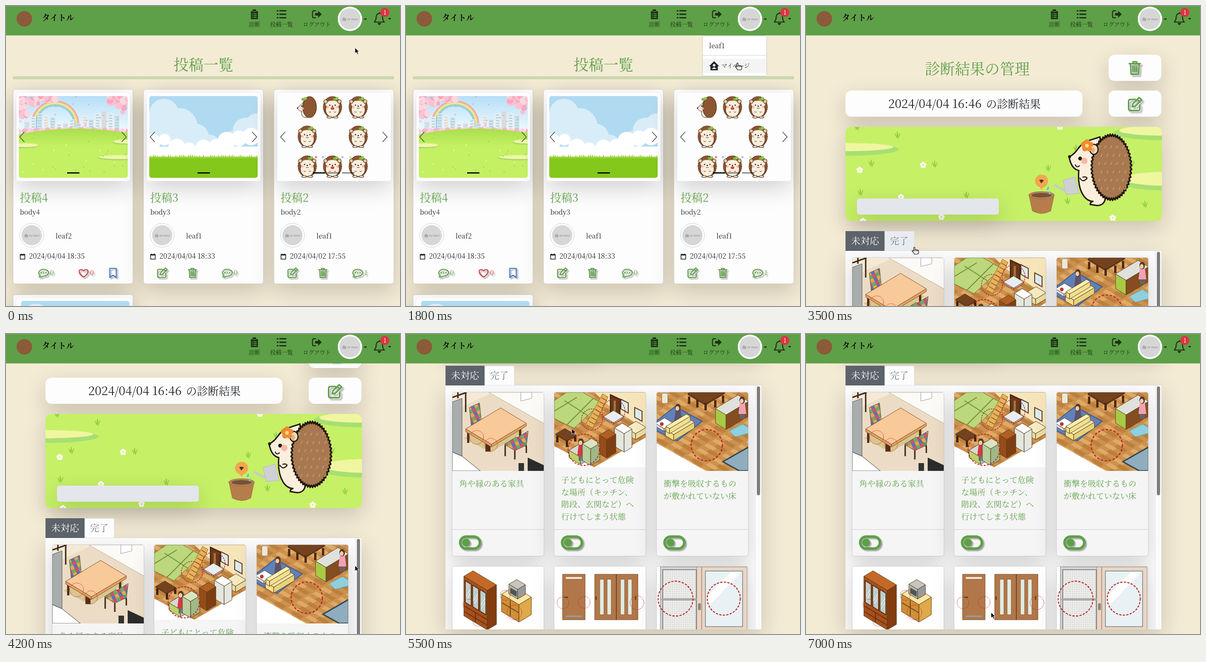
These frames come from a looping animation (858x653 px, 7100 ms). An HTML page:

```html
<!DOCTYPE html>
<html lang="ja">
<head>
<meta charset="utf-8">
<style>
html, body { margin: 0; width: 100%; height: 100%; overflow: hidden; background: #f4ebd5; }
#stage { position: relative; width: 858px; height: 653px; overflow: hidden; }
#stage div, #stage svg { position: absolute; box-sizing: border-box; }
#stage .layer { left: 0; top: 0; width: 858px; height: 653px; overflow: visible; }
.lift { box-shadow: 0 16px 48px rgba(0,0,0,.175); }
.drop { filter: drop-shadow(3px 3px 1px rgba(0,0,0,.32)); }
.line { fill: none; stroke: currentColor; stroke-width: 2.2; stroke-linejoin: round; stroke-linecap: round; }
text { font-family: "Noto Serif CJK JP", "Noto Serif JP", "Noto Serif", "Noto Sans CJK JP", serif; white-space: pre; }
.bold { font-weight: 500; }
</style>
</head>
<body>
<div id="stage"></div>
<script>
const GREEN = '#5ea047', SLATE = '#5c636a', INK = '#212529', DARK = '#22150d', NAV = '#1c2e15';
const USERS = ['leaf1', 'leaf2'], MAIL = 'leafbox@domain.test';

// Drawing helpers
const box = (x, y, w, h, css = '', inner = '', cls = '') =>
  `<div class="${cls}" style="left:${x}px;top:${y}px;width:${w}px;height:${h}px;${css}">${inner}</div>`;
const layer = s => `<svg class="layer">${s}</svg>`;
const pic = (x, y, w, h, r, s) => box(x, y, w, h, `border-radius:${r};overflow:hidden`,
  `<svg width="${w}" height="${h}" viewBox="${x} ${y} ${w} ${h}">${s}</svg>`);
const text = (x, y, size, s, fill = INK, attr = '') =>
  `<text x="${x}" y="${y}" font-size="${size}" fill="${fill}" ${attr}>${s}</text>`;
const head = (x, y, size, s, fill = GREEN) => text(x, y, size, s, fill, 'class="bold"');
const path = (d, fill, line = 'none', w = 1, attr = '') =>
  `<path d="${d}" fill="${fill}" stroke="${line}" stroke-width="${w}" ${attr}/>`;
const poly = (pts, fill, line, w) => path(`M${pts}Z`, fill, line, w);
const pen = (d, c, w) => path(d, 'none', c, w);
const oval = (x, y, a, b, fill, attr = '') => `<ellipse cx="${x}" cy="${y}" rx="${a}" ry="${b}" fill="${fill}" ${attr}/>`;
const dot = (x, y, r, fill, attr) => oval(x, y, r, r, fill, attr);
const rect = (x, y, w, h, fill, attr = '') =>
  `<rect x="${x}" y="${y}" width="${w}" height="${h}" fill="${fill}" ${attr}/>`;
const at = (x, y, k, s, attr = '') => `<g transform="translate(${x} ${y}) scale(${k})" ${attr}>${s}</g>`;
const each = (list, f) => list.map(f).join('');
const many = (n, f) => each([...Array(n).keys()], f);
const rnd = n => { const v = Math.sin(n * 127.1 + 3.7) * 43758.5453; return v - Math.floor(v); };

// Icons, centred on 0,0
const line = d => `<path class="line" d="${d}"/>`;
const solid = d => path(d, 'currentColor');
const icons = {
  clip: bg => solid('M-8 -7H-4V-11H4V-7H8V11H-8Z') + pen('M-4 -6H4', bg, 1.2) + each([-1, 3, 7], y => pen(`M-6 ${y}H-4M-2 ${y}H5`, bg, 1.8)),
  list: () => each([-8, 0, 8], y => pen(`M-11 ${y}H-7M-5 ${y}H11`, 'currentColor', 3)),
  out: () => line('M-3 -8H-7Q-10 -8 -10 -5V5Q-10 8 -7 8H-3') + solid('M-4 -3H3V-8L11 0L3 8V3H-4Z'),
  bell: () => line('M-11 8Q-7 4 -7 -2Q-7 -10 0 -11Q7 -10 7 -2Q7 4 11 8ZM0 -11V-13') + solid('M-4 10H4Q3 14 0 14Q-3 14 -4 10'),
  cal: () => pen('M-5 -4H5V6H-5ZM-3 -6V-4M3 -6V-4', 'currentColor', 1.5) + solid('M-5 -5H5V-2H-5Z'),
  chat: () => line('M-8 5C-14 0 -9 -8 0 -8C14 -8 14 7 0 7Q-4 9 -10 9Q-8 7 -8 5Z') + each([-5, 0, 5], x => dot(x, -.5, 1.6, 'currentColor')),
  heart: () => line('M0 9C-16 -1 -9 -12 0 -5C9 -12 16 -1 0 9Z'),
  mark: () => line('M-7 -10H7V10L0 5L-7 10Z'),
  edit: () => line('M1 -8H-7Q-10 -8 -10 -5V7Q-10 10 -7 10H5Q8 10 8 7V1M-4 4L-3 -1L7 -11L11 -7L1 3ZM4 -8L8 -4'),
  trash: () => line('M-9 -7H9M-3 -7V-10H3V-7M-7 -7L-6 10H6L7 -7M-3 -3V6M0 -3V6M3 -3V6'),
  user: () => dot(-6, -8, 8, 'currentColor') + solid('M-19 13Q-18 2 -6 2Q0 2 4 6L0 13ZM3 14L5 8L14 -1L19 4L10 13Z'),
  home: () => solid('M-11 1L0 -10L11 1H8V10H-8V1Z') + dot(0, -1, 2.8, '#fff') + path('M-5 7Q0 0 5 7Z', '#fff')
};
const icon = (name, x, y, k = 1, color = GREEN, bg = GREEN) =>
  at(x, y, k, icons[name](bg), `style="color:${color}" class="drop"`);
const flat = (...a) => icon(...a).replace('class="drop"', '');

const avatar = (x, y, r, gap, edge = 'none') => dot(x, y, r, '#fff', `stroke="${edge}"`) + dot(x, y, r - gap, '#d6d6d6') +
  at(x, y, (r - gap) / 81, path('M-57 -4H-50V-8H-38V-4H-31V16H-57Z', '#999') + dot(-44, 6, 7, 'none', 'stroke="#d6d6d6" stroke-width="2"') +
    pen('M-57 17L-33 -8', '#d6d6d6', 2.5) +
    `<text x="-21" y="10" font-size="17" font-weight="600" fill="#999" style="font-family:'Open Sans',sans-serif">NO IMAGE</text>`);

// Carousel pictures
const spring = () => {
  const blossom = (x, y, w, h, n) => many(n, i => dot(x + rnd(x + i) * w, y + rnd(x + i + 50) * h,
    4 + rnd(i + y) * 4, ['#f9c3d2', '#f7a9c0', '#fbd7e0'][i % 3]));
  return pic(28, 196, 237, 178, '5px', at(28, 196, 1, rect(0, 0, 237, 178, 'url(#sky)') +
    each(['#f3a2a2', '#f7c88a', '#f5ec95', '#a9dba0', '#93c8ec'], (c, i) => dot(79, 62, 51 - i * 2.5, 'none', `stroke="${c}" stroke-width="2.6"`)) +
    many(15, i => { const h = 18 + rnd(i) * 28, x = 12 + i * 14;
      return rect(x, 78 - h, 11, h, i % 2 ? '#e8eef0' : '#d2e3ec') +
        many(h / 6 | 0, j => rect(x + 2, 81 - h + j * 6, 7, 2, i % 3 ? '#a9cbdc' : '#e9cdb7')); }) +
    many(20, i => dot(i * 12.5, 77 - 4 * Math.sin(i / 6), 6, i % 2 ? '#f7b5c6' : '#fad0da')) +
    path('M0 83Q115 60 237 80V178H0Z', 'url(#hill)') +
    each([[12, 109, 28], [216, 135, 44], [230, 101, 26]], ([x, y, a]) => oval(x, y, a, 5, '#a3dc70') + oval(x + 2, y - 2, a, 4, '#f2f6a5')) +
    many(28, i => dot(rnd(i + 9) * 237, 90 + rnd(i + 40) * 84, 1.1, i % 3 ? '#8ecb3f' : '#fff')) +
    blossom(0, 0, 80, 9, 24) + blossom(2, 6, 40, 14, 16) + blossom(1, 14, 18, 32, 12) + blossom(192, 0, 45, 18, 22) + blossom(216, 10, 22, 28, 10) +
    many(18, i => dot(rnd(i + 3) * 237, rnd(i + 70) * 70, 1.6, '#f6a5bd'))));
};
const meadow = (x, y) => {
  const puffs = (list, c) => each(list, ([a, b, r]) => dot(a, b, r, c));
  return pic(x, y, 236, 178, '5px', at(x, y, 1, rect(0, 0, 236, 178, '#b0daf1') +
    puffs([[32, 38, 32], [65, 66, 40], [100, 90, 30], [132, 106, 22], [210, 75, 28], [182, 98, 22], [232, 58, 20], [5, 70, 34]], '#d9edf8') +
    puffs([[8, 100, 17], [33, 95, 13], [60, 112, 19], [87, 116, 15], [118, 112, 17], [145, 110, 16], [168, 97, 19], [196, 92, 17], [222, 88, 19]], '#fff') +
    rect(0, 110, 236, 30, '#fff') + rect(0, 133, 236, 45, '#84c81b') +
    poly('0 136 ' + many(119, i => `${i * 2} ${i % 2 ? 126 + rnd(i) * 5 : 134} `) + '238 136', '#92d02f')));
};
const hogs = () => {
  const edge = 'stroke="#4b2c18" stroke-width="1.2"', cream = '#fbefdc';
  const pair = (x, f) => f(-x) + f(x);
  const side = path('M-1 -18Q-10 -8 -22 2Q-16 10 -12 9Q-16 24 2 23L9 12Z', cream, '#4b2c18') + oval(5, 0, 15, 23, '#8b5631', edge) +
    dot(-12, -2, 1.4, '#222') + dot(-10, 3, 2.5, '#f6b5ad') + dot(-21, 2, 1.5, '#222');
  const front = i => oval(0, 0, 20, 23, '#8b5631', edge + ' stroke-dasharray="3 1"') + oval(0, 6, 15, 16, cream, edge) + oval(0, -6, 15, 8, cream) +
    pair(15, x => dot(x, -12, 4, '#e9c7a3', edge)) + pair(6, x => dot(x, -4, 1.4, '#222')) + pair(11, x => dot(x, 0, 2.6, '#f6b5ad')) +
    dot(0, -2, 1.5, '#222') + (i % 5 === 1 ? oval(0, 3, 4, 3, '#d9463f') : pen('M-3 2Q0 4 3 2', '#333')) +
    pen('M-8 10q3 3 5 0M3 10q2 3 5 0', '#4b2c18') + pair(7, x => oval(x, 22, 5, 2, cream, edge));
  return each([0, 1, 2, 3, 5, 6, 7, 8], (n, i) => at([656, 711, 767][n % 3], [220, 284, 349][n / 3 | 0], 1,
    (i ? front(i) : side) + oval(i ? 6 : -8, -17, 5, 3, '#7cb83e') + oval(i ? 10 : -4, -19, 3, 3, '#93cd50'))) +
    each(['#ee7e8a', '#9fd3ee', '#9fd3ee', '#d7e68a'], (c, i) => dot([675, 690, 733, 750][i], 329, 2.5, c));
};

const banner = () => {
  const tuft = ([x, y]) => pen(`M${x - 5} ${y - 9}L${x - 1} ${y}L${x} ${y - 13}L${x + 2} ${y}L${x + 6} ${y - 10}`, '#97cf4b', 2);
  const flower = (x, y, k = 1, c = '#fff') => at(x, y, k, many(5, i => dot(4 * Math.sin(i * 1.257), -4 * Math.cos(i * 1.257), 3, c)) + dot(0, 0, 2, '#f8e07a'));
  const spines = many(104, i => {
    const a = i * Math.PI / 52, k = i % 2 ? 1.03 : .96;
    return `${(665 + 43 * k * Math.cos(a)).toFixed(1)} ${(351 + 70 * k * Math.sin(a)).toFixed(1)} `;
  });
  return pic(86, 263, 689, 205, '12px', rect(86, 263, 689, 205, '#c6f066') +
    each([[86, 312, 116, 14], [775, 276, 105, 16], [775, 381, 95, 20]], ([x, y, a, b]) => oval(x, y, a, b, '#a7df72') + oval(x, y - 5, a - 12, b - 5, '#f0f6a0')) +
    each([[199, 287], [142, 348], [280, 350], [118, 411], [349, 417], [527, 358], [569, 430], [738, 437], [588, 315], [709, 348], [111, 269]], tuft) +
    each([[117, 357], [255, 346], [207, 416], [295, 459], [668, 461], [553, 263], [124, 468]], p => flower(...p)) +
    path('M486 413L493 446Q513 457 533 446L540 413Z', '#b67d4b', '#9c673b') + oval(513, 412, 28, 8, '#b98453', 'stroke="#9c673b"') + oval(513, 412, 22, 5, '#76503a') +
    path('M508 393L513 400L518 393Z', '#f3a64f') + dot(513, 381, 14, '#f3a64f') + path('M508 379Q514 376 518 380L512 386Z', '#54331e') +
    path('M528 392q-7 7 -2 9q5 -1 2 -9M532 402q-6 6 -2 8q5 0 2 -8', '#66bfe8') +
    pen('M540 389L564 402', '#c9cace', 5) + path('M560 379L586 372L595 408L566 410Z', '#cfd0d4', '#b8b9be') +
    path('M573 328C588 322 594 305 606 296L640 285L650 415C654 424 646 436 632 434L619 432Q619 426 626 425C612 427 590 408 594 358C584 356 576 346 573 328Z', '#fbefdc', DARK, 3) +
    path(`M${spines}Z`, '#a87850', DARK, 3.2, 'stroke-linejoin="round"') +
    many(30, i => pen(`M${640 + i % 5 * 13 + (i / 5 & 1) * 5} ${304 + (i / 5 | 0) * 18}l-3 6`, '#c99a6e', 2)) +
    oval(627, 312, 9, 11, '#f0dcb9', `stroke="${DARK}" stroke-width="2.5"`) + oval(625, 314, 4, 6, '#dfb181') +
    dot(597, 332, 4.2, DARK) + dot(606, 337, 7, '#f8b7a8') + dot(574, 328, 3.3, DARK) + pen('M586 345Q590 354 596 347', DARK, 2) +
    path('M596 374Q603 386 612 375Q610 370 602 373', '#fbefdc', DARK, 2.4) + flower(612, 304, 2, '#f18a35'));
};

// Room pictures: block() is an isometric box standing on its front corner
const block = (x, y, a, b, h, top, left, right = left, c = '#5a3a20') => at(x, y, 1,
  poly(`0 0 ${-a} ${-a * .6}v${-h}L0 ${-h}`, left, c) + poly(`0 0 ${b} ${-b * .6}v${-h}L0 ${-h}`, right, c) +
  poly(`0 ${-h} ${-a} ${-a * .6 - h} ${b - a} ${-(a + b) * .6 - h} ${b} ${-b * .6 - h}`, top, c));
const ring = (x, y, r, w = 1) => dot(x, y, r, 'none', `stroke="#c0281f" stroke-width="${w}" stroke-dasharray="${w * 2.2} ${w * 1.3}"`);
const legs = (list, h, c = '#53301d') => each(list, ([x, y]) => rect(x, y, 5, h, c));
const person = (x, y, top) => legs([[x - 5, y + 24], [x + 1, y + 24]], 17, '#666') +
  path(`M${x - 8} ${y + 30}L${x - 5} ${y + 6}H${x + 6}L${x + 9} ${y + 30}Z`, top) + oval(x, y, 6, 8, '#5b3826') + oval(x - 1, y + 2, 4, 5, '#f3cda8');
const PATCH = 'url(#patch)', WOOD = 'url(#wood)';
const rooms = [
  () => rect(101, 127, 200, 171, '#ecdcc5') + poly('101 127 190 127 101 168', '#f5e9d6') + poly('180 127 301 127 301 195', '#fcfaf6', '#b8aa98') +
    poly('101 148 122 140 122 266 101 257', '#a9adad', '#555') + poly('101 257 122 266 162 298 101 298', '#fff', '#333') +
    pen('M101 138L132 127M113 127V140M130 127V170', '#3b2418', 3) + poly('250 127 274 127 274 140 250 146', '#fff', '#999') + poly('125 226 184 258 258 212 235 190', '#d8c68e') +
    poly('138 160 160 150 164 188 142 198', PATCH, '#553') + poly('142 198 164 186 180 195 158 206', PATCH, '#553') + legs([[133, 214], [246, 207]], 23) + rect(173, 238, 11, 18, '#53301d') +
    block(186, 246, 56, 76, 6, '#f8c999', '#e59f64', '#e59f64', '#81502b') + poly('266 211 262 244 235 246 241 226', PATCH, '#553') + poly('214 240 240 224 262 242 237 254', PATCH, '#553') +
    pen('M216 242V266M237 254V273M262 243V259', '#3b2418', 3) + rect(245, 281, 12, 17, '#333') + poly('265 269 301 286 301 298 265 298', '#2c2c2c') + ring(154, 225, 15) + ring(185, 241, 14),
  () => poly('323 127 524 127 524 224 410 290 323 244', WOOD) + poly('410 127 524 127 524 210 440 155', '#f7e5ba', '#c8a570') +
    poly('323 145 350 127 385 127 425 150 366 205 323 184', '#bcd77c', '#617e36') + pen('M345 145L395 177M323 168L372 138M350 198L408 140', '#6f913b', 2) +
    poly('391 198 428 130 440 137 405 208', '#e7b35d', '#98662b') + many(8, i => pen(`M${394 + i * 4.5} ${198 - i * 8.5}l12 7`, '#9a6428', 2)) +
    poly('445 132 466 142 466 185 445 176', '#67381b', '#3b2212', 2) + rect(452, 145, 5, 28, '#a4723c') +
    each([[468, 142], [498, 160]], ([x, y]) => path(`M${x} ${y}l16 8v22l-16 -9Z`, '#dcebf0', '#623a20', 2)) +
    block(452, 196, 22, 22, 3, '#e8edf0', '#ccc') + block(500, 230, 22, 23, 13, '#f4ecc0', '#eadca2') + block(475, 257, 21, 17, 40, '#fff', '#e4e7de') +
    block(437, 270, 16, 20, 40, '#b0601f', '#974c16', '#7d3f12') + block(350, 234, 24, 20, 2, '#74421f', '#603719') + legs([[327, 222], [348, 232], [366, 220]], 14, '#422411') +
    block(380, 284, 25, 28, 16, '#d8dad4', '#bad267', '#bbb') + person(381, 235, '#d63944') + block(402, 286, 18, 20, 36, '#d7e6c0', '#b8cf9b', '#9fb986') +
    ring(405, 186, 23, 1.5) + ring(452, 168, 25, 1.5) + ring(387, 252, 34, 2),
  () => rect(545, 127, 201, 171, WOOD) + poly('545 237 653 298 545 298', '#fff') + poly('545 190 586 158 645 190 590 233 545 210', '#5f82b8', '#3f5d91', 2) +
    block(562, 212, 19, 20, 6, '#fff', '#ddd') + dot(557, 196, 4, '#bc3b33') + rect(557, 129, 13, 22, '#efe8d8', 'rx="3" stroke="#8c7b64"') + person(592, 160, '#605366') +
    block(583, 232, 18, 45, 13, '#f7e7a0', '#f2df8e', '#ead27b') + block(574, 217, 8, 45, 11, '#fff0ad', '#f2df8e') +
    block(652, 155, 38, 42, 3, '#74421f', '#5f3418') + legs([[614, 136], [650, 150], [688, 134], [632, 144], [671, 144]], 16, '#50290f') +
    block(697, 208, 23, 49, 32, '#dfe2dc', '#a9c945', '#844d22') + poly('704 211 733 196 746 204 746 216 717 224', '#8fd0de', '#4e9fb2') + person(732, 144, '#f3a1b6') +
    poly('690 278 746 246 746 298 726 298', '#90adbd', '#344851', 3) + ring(655, 242, 34, 2.5),
  () => block(177, 644, 51, 20, 86, '#c46927', '#a5521b', '#823d11') +
    many(3, i => at(129 + i * 16, 537 + i * 9.6, 1, path('M0 0l13 8v47l-13 -8Z', '#bcd0cc', '#663312', 2) + pen('M2 34l9 -15M3 42l8 -14', '#fff'))) +
    pen('M127 592L177 622M127 604L177 634M151 605V628', '#64310d', 2) + block(246, 627, 38, 27, 38, '#fae7a2', '#d08e36', '#dfa948') + pen('M209 585L246 607M227 579V614', '#724719', 2) +
    block(243, 577, 19, 17, 21, '#c5c5be', '#b8b8b1', '#999') + path('M227 552l14 8v12l-14 -8Z', '#4d5555') + ring(136, 589, 12) + ring(216, 569, 11) + ring(236, 606, 16) + ring(157, 624, 12),
  () => rect(341, 523, 49, 99, '#b27748', 'stroke="#794d2c"') + rect(348, 529, 35, 4, '#f1eadc') + rect(348, 613, 35, 3, '#89a2b3') + rect(344, 572, 9, 2, '#333') +
    rect(411, 523, 94, 99, '#b27748', 'stroke="#794d2c"') + pen('M458 523V622', '#724626', 2) + pen('M414 571V579M500 571V579', '#543017', 2) +
    each([422, 438, 467, 483], x => rect(x, 534, 9, 77, '#e1ebe2', 'stroke="#8e633f"')) + ring(342, 585, 13) + ring(388, 584, 13) + ring(503, 585, 15),
  () => rect(554, 507, 80, 170, '#d5d5d5', 'stroke="#777"') + rect(559, 513, 73, 164, 'url(#mesh)', 'stroke="#888" stroke-width="2"') + rect(556, 575, 78, 5, '#aaa') +
    each([[633, 11], [644, 99]], ([x, w]) => rect(x, 507, w, 170, '#ead5c3', 'stroke="#8e7a6e"')) + rect(652, 516, 81, 121, '#e8f2f5', 'stroke="#929a9c" stroke-width="2"') +
    poly('653 575 708 517 731 517 653 599', '#fff') + rect(636, 586, 6, 15, '#888', 'rx="2"') + ring(587, 576, 38, 2.2) + ring(692, 576, 36, 2.2)
];

const pattern = (id, w, h, turn, s) => `<pattern id="${id}" width="${w}" height="${h}" patternUnits="userSpaceOnUse" patternTransform="${turn}">${s}</pattern>`;
const fade = (id, a, b, end) => `<linearGradient id="${id}" x2="0" y2="1"><stop stop-color="${a}"/><stop offset="${end}" stop-color="${b}"/></linearGradient>`;
const defs = '<svg width="0" height="0">' + fade('sky', '#b5dff7', '#f3fbff', .45) + fade('hill', '#a9df4d', '#c4f064', .35) +
  pattern('wood', 44, 20, 'matrix(.87 .5 -.87 .5 0 0)', rect(0, 0, 44, 20, '#cc914e') + rect(0, 0, 22, 10, '#dfaa65') + rect(16, 10, 24, 10, '#bd7f3d')) +
  pattern('patch', 16, 16, 'rotate(-24)', each(['#d94d65', '#65ad68', '#5674bb', '#eda34f'], (c, i) => rect(i % 2 * 8, (i >> 1) * 8, 8, 8, c))) +
  pattern('mesh', 4, 4, '', rect(0, 0, 4, 4, '#f5f5f4') + pen('M0 0H4M0 0V4', '#b9bab9')) + '</svg>';

// Pages
const navItem = (name, x, label, w) => flat(name, x, 18, .95, NAV) + text(x - w / 2, 45, w / label.length, label, NAV);
const header = box(0, 0, 858, 64, `background:${GREEN}`) + layer(
  dot(40, 28, 17, '#8b5a38') + text(78, 32, 17.8, 'タイトル', '#111', 'font-weight="700"') +
  `<g id="nav">${navItem('clip', 541, '診断', 24.5)}${navItem('list', 600, '投稿一覧', 50)}${navItem('out', 677, 'ログアウト', 61)}` +
  avatar(749, 28, 26.5, 3.5) + poly('779 27 786 27 782.5 31', NAV) + flat('bell', 813, 27, 1, NAV) +
  poly('832 26 839 26 835.5 30', NAV) + dot(825, 14, 10, '#dc3545') + text(825, 19, 13, '1', '#fff', 'text-anchor="middle"') + '</g>');

const panel = (x, y, w, h, r = 5, css = '') => box(x, y, w, h, `background:#fdfdfd;border-radius:${r}px;${css}`, '', 'lift');
const frame = (x, y) => panel(x, y, 262, 424, 6, 'border:1px solid #d3d3d0') + panel(x + 8, y + 8, 247, 192);
function post(x, n, user, date, count, own, image) {
  const chevron = (cx, s) => pen(`M${cx + 5 * s} 274L${cx - 5 * s} 285L${cx + 5 * s} 296`, '#4d5550', 1.6);
  const tally = (dx, s, c = GREEN) => text(x + dx, 586, 15, s, c, 'class="drop"');
  const actions = own
    ? icon('edit', x + 41, 581) + icon('trash', x + 107, 581) + icon('chat', x + 183, 581) + tally(197, count)
    : icon('chat', x + 67, 581) + tally(81, count) + icon('heart', x + 154, 581, 1, '#d0404a') + tally(168, '0', '#d0404a') + icon('mark', x + 218, 581, 1, '#3f78cf');
  return frame(x, 181) + image + layer(chevron(x + 20, 1) + chevron(x + 242, -1) +
    each(n === 2 ? [85, 117, 149] : [118], (b, i) => rect(x + b, 362, 27, 2.6, '#000', `opacity="${i ? .5 : 1}"`)) +
    head(x + 15, 426, 24, '投稿' + n) + text(x + 15, 454, 14.8, 'body' + n) + avatar(x + 41, 499, 26, 4, '#cfcfcf') + text(x + 93, 506, 14.8, user) +
    flat('cal', x + 21, 545, 1, INK) + text(x + 35, 550, 15.4, date) + actions);
}
const listPage = layer(head(365, 140, 32.5, '投稿一覧') + rect(15, 153, 830, 6.5, '#cbd7b0')) +
  post(15, 4, USERS[1], '2024/04/04 18:35', '0', false, spring()) +
  post(299, 3, USERS[0], '2024/04/04 18:33', '0', true, meadow(312, 196)) +
  post(583, 2, USERS[0], '2024/04/02 17:55', '1', true, layer(hogs())) + frame(15, 628) + meadow(33, 642) +
  `<div id="menu">${box(645, 64, 141, 89, 'background:#fff;border:1px solid #c9c9c4;border-radius:5px')}` + box(646, 115, 139, 31, 'background:#f4f4f4', '', 'hover') +
  layer(text(660, 92, 14.8, USERS[0]) + rect(646, 107, 139, 1, '#d5d5d5') + flat('home', 671, 130, 1, INK) + text(687, 135, 12.4, 'マイページ')) + '</div>';

const button = (x, w, bg = 'none') => box(x, 449, w, 35, `border:1px solid ${SLATE};border-radius:5px;background:${bg}`, '', 'lift');
const myPage = box(93, 161, 170, 170, 'border-radius:50%', '', 'lift') + button(22, 128, SLATE) + button(355, 106) + button(667, 185) +
  panel(22, 505, 830, 41, 5, 'background:linear-gradient(90deg,#f1f1f0 11px,#fdfdfd 11px 819px,#f1f1f0 819px)') + layer(
  head(93, 138, 32.5, 'マイページ') + icon('user', 297, 128) + avatar(178, 246, 85, 4) +
  text(93, 376, 20.5, '名前') + text(329, 377, 23, USERS[0]) + head(93, 411, 20.5, 'メールアドレス', INK) + text(329, 412, 23, MAIL) +
  rect(22, 439, 830, 2.6, GREEN) + flat('clip', 41, 467, .95, '#fff', SLATE) + text(53, 472, 14.2, '診断結果一覧', '#fff') +
  text(367, 472, 14.6, 'My', SLATE) + text(394, 472, 14.2, '投稿一覧', SLATE) + path('M679 456H695V477L687 471L679 477Z', '#3f78cf') + text(699, 472, 14.1, 'お気に入りの投稿一覧', SLATE) +
  text(46, 532, 19.3, '2024/04/04 16:46', GREEN) + text(206, 532, 17.6, 'の診断結果', GREEN) + icon('trash', 818, 524, 1.05));

const hazards = [['角や縁のある家具'], ['子どもにとって危険', 'な場所（キッチン、', '階段、玄関など）へ', '行けてしまう状態'], ['衝撃を吸収するもの', 'が敷かれていない床'], [], [], []];
const hazard = (lines, i) => {
  const x = [100, 322, 545][i % 3], y = i < 3 ? 126 : 505, short = i === 1 ? 8 : 0;
  return panel(x, y, 201, 358, 5, 'background:#f5f5f5;border:1px solid #cfcfcf') +
    pic(x + 1, y + 1, 199, 171 - short, '4px 4px 0 0', rect(x, y, 201, 180, '#fff') + rooms[i]()) +
    layer(each(lines, (s, j) => head(x + 16, y + 206 - short + j * 26.6, 17.6, s)) + rect(x + 1, y + 299, 199, 1, '#cfcfcf') +
      `<g class="drop">${rect(x + 18, y + 315, 43, 26, 'none', `rx="13" stroke="${GREEN}" stroke-width="5.5"`) + dot(x + 31, y + 328, 8.5, GREEN)}</g>`);
};
const resultPage = panel(659, 106, 115, 57, 13) + panel(86, 184, 516, 57, 13) + panel(659, 184, 115, 57, 13) + panel(86, 263, 689, 205, 12) + banner() +
  panel(111, 419, 309, 35, 5, 'background:#e3e6ea') +
  layer(head(259, 149, 32.6, '診断結果の管理') + text(179, 222, 25.8, '2024/04/04 16:46') + head(392, 222, 23.8, 'の診断結果', INK) +
    icon('trash', 716, 135, 1.35) + icon('edit', 716, 214, 1.35)) +
  panel(86, 532, 688, 532, 0, 'border-top:1px solid #d5d8da') +
  box(86, 533, 688, 531, 'overflow:hidden', box(-86, -112, 858, 900, '', each(hazards, hazard) +
    box(760, 111, 14, 533, 'background:#fafafa;border-left:1px solid #e4e4e4') + box(764, 114, 7, 237, 'background:#7e7e7e;border-radius:4px'))) +
  box(86, 490, 85, 43, `background:${SLATE}`) + box(171, 490, 65, 43, 'border:1px solid #dee2e6', '', 'tab') +
  layer(head(98, 519, 20.4, '未対応', '#fff') + head(183, 519, 20, '完了', '#6c757d'));

const cursor = layer(`<g id="cursor">${path('M0 0V12L3 9.5L5.2 14L7.4 13L5.2 8.8H9Z', '#000', '#fff', .8, 'id="arrow"')}` +
  path('M-1.5 1Q0 -1 1.2 1V6Q3 4.5 4.3 6Q6 5 7 6.7Q9 6 9.3 8V11Q8.5 13 7.5 15H0Q-2 11 -5 8Q-4.5 6 -1.5 8.2ZM1.2 6V9M4.3 6.3V9M7 7V9', '#fff', '#000', 1.1, 'id="hand"') + '</g>');

document.getElementById('stage').innerHTML = defs +
  each([listPage, myPage, resultPage], s => box(0, 0, 858, 653, '', s, 'page')) + header + cursor;

// Timeline
const LOOP = 7100, STEP = 100;
const track = [[0, 760, 91], [200, 760, 91], [700, 754, 34], [1100, 754, 34], [1700, 722, 124], [2200, 722, 124], [2800, 249, 511], [3300, 249, 511],
  [3500, 236, 525], [3600, 236, 525], [3900, 760, 504], [4800, 760, 504], [5500, 361, 206], [5800, 361, 206], [7000, 403, 606], [7100, 403, 606]];
const $ = s => document.querySelector(s);
const pages = document.querySelectorAll('.page');
const show = (el, on) => el.style.display = on ? '' : 'none';
const ease = p => (p = Math.max(0, Math.min(1, p))) < .5 ? 2 * p * p : 1 - 2 * (1 - p) ** 2;

function draw(t) {
  const within = (a, b) => t >= a && t < b;
  const page = t < 2200 ? 0 : t < 3300 ? 1 : 2;
  pages.forEach((el, i) => show(el, i === page));
  $('#nav').setAttribute('transform', `translate(${page === 1 ? 13.4 : 0} 0)`);
  show($('#menu'), within(1000, 2200));
  show($('.hover'), t >= 1600);
  $('.tab').style.background = within(3400, 3700) ? '#e9ecef' : '#fdfdfd';
  pages[2].style.transform = `translateY(${-Math.round(421 * ease((t - 3910) / 890))}px)`;
  const k = track.findIndex(p => p[0] > t), [a, ax, ay] = track[k - 1], [b, bx, by] = track[k];
  const p = ease((t - a) / (b - a));
  $('#cursor').setAttribute('transform', `translate(${ax + (bx - ax) * p} ${ay + (by - ay) * p})`);
  const hand = within(600, 1200) || within(1600, 2200) || within(2800, 3700);
  show($('#hand'), hand);
  show($('#arrow'), !hand);
}
const start = performance.now();
function tick() {
  const t = Math.max(0, performance.now() - start) % LOOP;
  draw(Math.floor(t / STEP) * STEP);
  requestAnimationFrame(tick);
}
tick();
</script>
</body>
</html>
```
